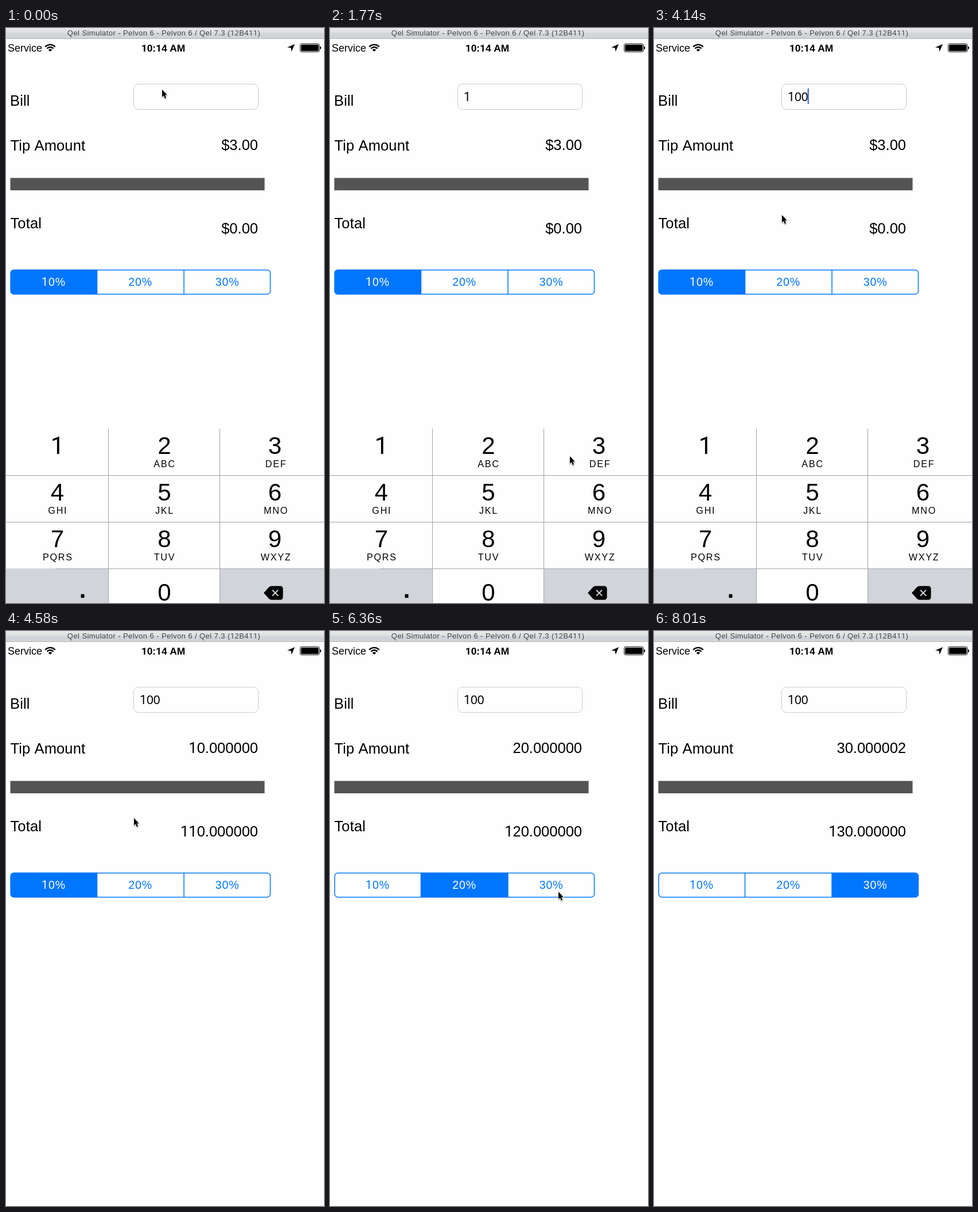
Animation, 554 px wide and 999 px high, one loop 8450 ms. Source, as an HTML page with a canvas:

```html
<!DOCTYPE html>
<html lang="en">
<head>
<meta charset="utf-8">
<title>Tip calculator</title>
<style>
html, body { margin: 0; width: 100%; height: 100%; overflow: hidden; background: #fefefe; }
canvas { display: block; width: 554px; height: 999px; }
</style>
</head>
<body>
<canvas id="stage" width="554" height="999"></canvas>
<script>
const ctx = document.getElementById('stage').getContext('2d');
const LOOP = 8450, STEP = 148;
const PAPER = '#fefefe', BLUE = '#0076ff', KEY_GREY = '#d1d5da', RULE = '#a3a3a3';
const SANS = '"Liberation Sans", Arial, sans-serif';
const PLAIN_ONE = 'Roboto, sans-serif'; // its 1 has no foot

// Pointer waypoints: step, x, y
const PATH = [
  [1, 272, 106], [3, 190, 400], [5, 96, 728], [7, 96, 728], [8, 210, 746],
  [9, 383, 752], [10, 411, 747], [11, 418, 743], [13, 418, 743], [15, 350, 850],
  [17, 274, 974], [22, 274, 974], [24, 262, 760], [26, 228, 380], [27, 223, 324],
  [33, 223, 324], [34, 172, 372], [35, 148, 425], [36, 231, 440], [41, 231, 440],
  [42, 320, 447], [43, 398, 452], [50, 398, 452], [51, 414, 560], [52, 470, 840], [53, 523, 967]
];
const POINTER_GONE = 54;

// Typed text by step, and key presses
const TYPED = [[0, ''], [7, '1'], [19, '10'], [21, '100']];
const PRESSES = { 6: '1', 18: '0', 20: '0' };
const SUMS = [[0, '$3.00', '$0.00'], [29, '10.000000', '110.000000'],
  [39, '20.000000', '120.000000'], [48, '30.000002', '130.000000']];
const SEGMENTS = [[0, 0], [39, 1], [48, 2]];
const HELD = { 38: 1, 47: 2 };
const SLIDE = { 29: 123, 30: 246 };
const KEYBOARD_GONE = 31;

const latest = (list, step) => list.filter(e => e[0] <= step).pop();

function rect(x, y, w, h, color) {
  ctx.fillStyle = color;
  ctx.fillRect(x, y, w, h);
}

function text(str, x, y, size, { color = '#000', align = 0, weight = 400, spacing = 0 } = {}) {
  ctx.letterSpacing = spacing + 'px';
  ctx.fillStyle = color;
  const runs = (str.match(/1|[^1]+/g) || []).map(s => {
    const font = `${weight} ${size}px ${s === '1' ? PLAIN_ONE : SANS}`;
    ctx.font = font;
    return { s, font, w: ctx.measureText(s).width };
  });
  const width = runs.reduce((sum, r) => sum + r.w, 0);
  let left = x - width * align;
  for (const r of runs) {
    ctx.font = r.font;
    ctx.fillText(r.s, left, y);
    left += r.w;
  }
  return width;
}

function shape(points, color) {
  ctx.beginPath();
  points.forEach(([x, y]) => ctx.lineTo(x, y));
  ctx.closePath();
  ctx.fillStyle = color;
  ctx.fill();
}

function box(x, y, w, h, r, color, line) {
  ctx.beginPath();
  ctx.roundRect(x, y, w, h, r);
  ctx.strokeStyle = color;
  ctx.lineWidth = line;
  ctx.stroke();
}

function drawBars() {
  const g = ctx.createLinearGradient(0, 0, 0, 18);
  g.addColorStop(0, '#e9e9e9');
  g.addColorStop(0.45, '#dedfe1');
  g.addColorStop(0.5, '#d2d5d9');
  g.addColorStop(1, '#d0d3d7');
  rect(0, 0, 554, 18, g);
  rect(0, 18, 554, 1, '#b4b5b7');
  text('Qel Simulator - Pelvon 6 - Pelvon 6 / Qel 7.3 (12B411)', 275, 13, 13,
    { color: '#454545', align: 0.5, spacing: 0.43 });

  text('Service', 3, 41, 18);
  text('10:14 AM', 274, 41, 17.3, { align: 0.5, weight: 700 });

  // Wi-Fi
  ctx.strokeStyle = '#000';
  ctx.lineWidth = 2.4;
  for (const r of [7.3, 11.6]) {
    ctx.beginPath();
    ctx.arc(77, 40.5, r, -Math.PI * 0.77, -Math.PI * 0.23);
    ctx.stroke();
  }
  ctx.beginPath();
  ctx.moveTo(77, 40.8);
  ctx.arc(77, 40.8, 4.4, -Math.PI * 0.77, -Math.PI * 0.23);
  ctx.fillStyle = '#000';
  ctx.fill();

  // Location arrow and battery
  shape([[503, 28], [497.5, 41], [496.5, 34.5], [490, 33.8]], '#000');
  box(512.5, 27.5, 33.5, 14, 2.5, '#000', 1);
  ctx.beginPath();
  ctx.roundRect(514, 29, 30.5, 11, 1.5);
  ctx.fill();
  ctx.beginPath();
  ctx.roundRect(547, 32, 2, 5, [0, 2, 2, 0]);
  ctx.fill();
}

function caretAlpha(step) {
  const [since, str] = latest(TYPED, step);
  if (!str || step >= 29) return 0;
  const p = (step - since) * STEP % 1050;
  if (p < 500) return 1;
  if (p < 700) return (700 - p) / 200;
  return p < 900 ? 0 : (p - 900) / 150;
}

function drawForm(step) {
  const [, tip, total] = latest(SUMS, step);
  const label = { spacing: 0.12 };
  text('Bill', 7, 135, 25.5, label);
  text('Tip Amount', 7.5, 213, 25.5, label);
  text('Total', 7.5, 348, 25.5, label);
  text(tip, 439, 212, 25.5, { align: 1 });
  text(total, 439, 357, 25.5, { align: 1 });
  rect(7.5, 260.5, 443, 21.5, '#545454');

  box(222.5, 97.5, 217, 44, 8, '#cbcbcb', 1);
  const width = text(latest(TYPED, step)[1], 233, 127, 21.2);
  ctx.globalAlpha = caretAlpha(step);
  rect(232 + width, 105, 2.5, 27, '#4169e6');
  ctx.globalAlpha = 1;
}

function drawSegments(step) {
  const chosen = latest(SEGMENTS, step)[1];
  const edges = [7.5, 158.5, 310, 461];
  ctx.save();
  ctx.beginPath();
  ctx.roundRect(7.5, 419.7, 453.5, 43.3, 6);
  ctx.clip();
  for (let i = 0; i < 3; i++) {
    const w = edges[i + 1] - edges[i];
    if (i === chosen) rect(edges[i], 419, w, 45, BLUE);
    else if (i === HELD[step]) rect(edges[i], 419, w, 45, '#d9ebff');
    if (i) rect(edges[i] - 0.75, 419, 1.5, 45, BLUE);
  }
  ctx.restore();
  box(8.25, 420.4, 452.2, 42, 5.5, BLUE, 1.5);
  [83, 234, 385.5].forEach((x, i) => text((i + 1) * 10 + '%', x, 448, 19.5,
    { color: i === chosen ? '#fff' : BLUE, align: 0.5, spacing: 0.9 }));
}

function drawBackspace() {
  ctx.beginPath();
  ctx.moveTo(449, 981.5);
  ctx.lineTo(458, 971.5);
  ctx.quadraticCurveTo(460, 969.5, 463, 969.5);
  ctx.lineTo(478, 969.5);
  ctx.arcTo(482.5, 969.5, 482.5, 974, 4.5);
  ctx.lineTo(482.5, 989);
  ctx.arcTo(482.5, 993.5, 478, 993.5, 4.5);
  ctx.lineTo(463, 993.5);
  ctx.quadraticCurveTo(460, 993.5, 458, 991.5);
  ctx.closePath();
  ctx.fillStyle = '#000';
  ctx.fill();
  ctx.beginPath();
  for (const d of [-5, 5]) {
    ctx.moveTo(469 - d, 976.5);
    ctx.lineTo(469 + d, 986.5);
  }
  ctx.strokeStyle = KEY_GREY;
  ctx.lineWidth = 2;
  ctx.stroke();
}

function drawKeyboard(step) {
  if (step >= KEYBOARD_GONE) return;
  const pressed = PRESSES[step];
  const letters = ['', 'ABC', 'DEF', 'GHI', 'JKL', 'MNO', 'PQRS', 'TUV', 'WXYZ'];
  const digitX = [89.5, 276, 468.5], letterX = [90.3, 276.5, 470.5];
  ctx.save();
  ctx.translate(0, SLIDE[step] || 0);
  rect(0, 696, 554, 303, PAPER);
  rect(0, 939, 179, 60, KEY_GREY);
  rect(373, 939, 181, 60, KEY_GREY);
  if (pressed === '1') rect(0, 696, 178, 81, KEY_GREY);
  if (pressed === '0') rect(179, 940, 193, 59, KEY_GREY);

  for (const x of [178, 372]) rect(x, 696, 1, 303, RULE);
  for (const y of [777, 858]) rect(0, y, 554, 1, RULE);
  rect(86, 939, 468, 1, RULE);

  letters.forEach((str, i) => {
    const col = i % 3, top = 696 + 81 * Math.floor(i / 3);
    text(String(i + 1), digitX[col], top + 44, 42, { align: 0.5 });
    text(str, letterX[col], top + 67, 16.2, { align: 0.5, spacing: 1.7 });
  });
  text('0', 276, 995, 42, { align: 0.5 });
  text('.', 133.5, 990, 42, { align: 0.5, weight: 700 });
  drawBackspace();
  ctx.restore();
}

function drawPointer(step) {
  if (step >= POINTER_GONE) return;
  const from = latest(PATH, step) || PATH[0];
  const to = PATH.find(p => p[0] > step) || from;
  const k = to === from ? 0 : Math.max(0, (step - from[0]) / (to[0] - from[0]));
  ctx.save();
  ctx.translate(from[1] + (to[1] - from[1]) * k, from[2] + (to[2] - from[2]) * k + 1);
  ctx.scale(0.88, 0.88);
  ctx.shadowColor = 'rgba(0,0,0,.35)';
  ctx.shadowBlur = 2;
  ctx.shadowOffsetY = 1;
  const arrow = [[0, 0], [0, 14.5], [3.2, 11.6], [5.6, 17.2], [8, 16.2], [5.6, 10.8], [9.8, 10.5]];
  shape(arrow, '#fff');
  ctx.strokeStyle = '#fff';
  ctx.lineWidth = 1.6;
  ctx.stroke();
  ctx.shadowColor = 'transparent';
  shape(arrow, '#000');
  ctx.restore();
}

function draw(ms) {
  // The screen refreshes in even steps, so all motion is held between them
  const step = Math.floor((ms % LOOP + 10) / STEP);
  rect(0, 0, 554, 999, PAPER);
  drawBars();
  drawForm(step);
  drawSegments(step);
  drawKeyboard(step);
  drawPointer(step);
}

const start = performance.now();
function tick() {
  draw(performance.now() - start);
  requestAnimationFrame(tick);
}
tick();
</script>
</body>
</html>
```
